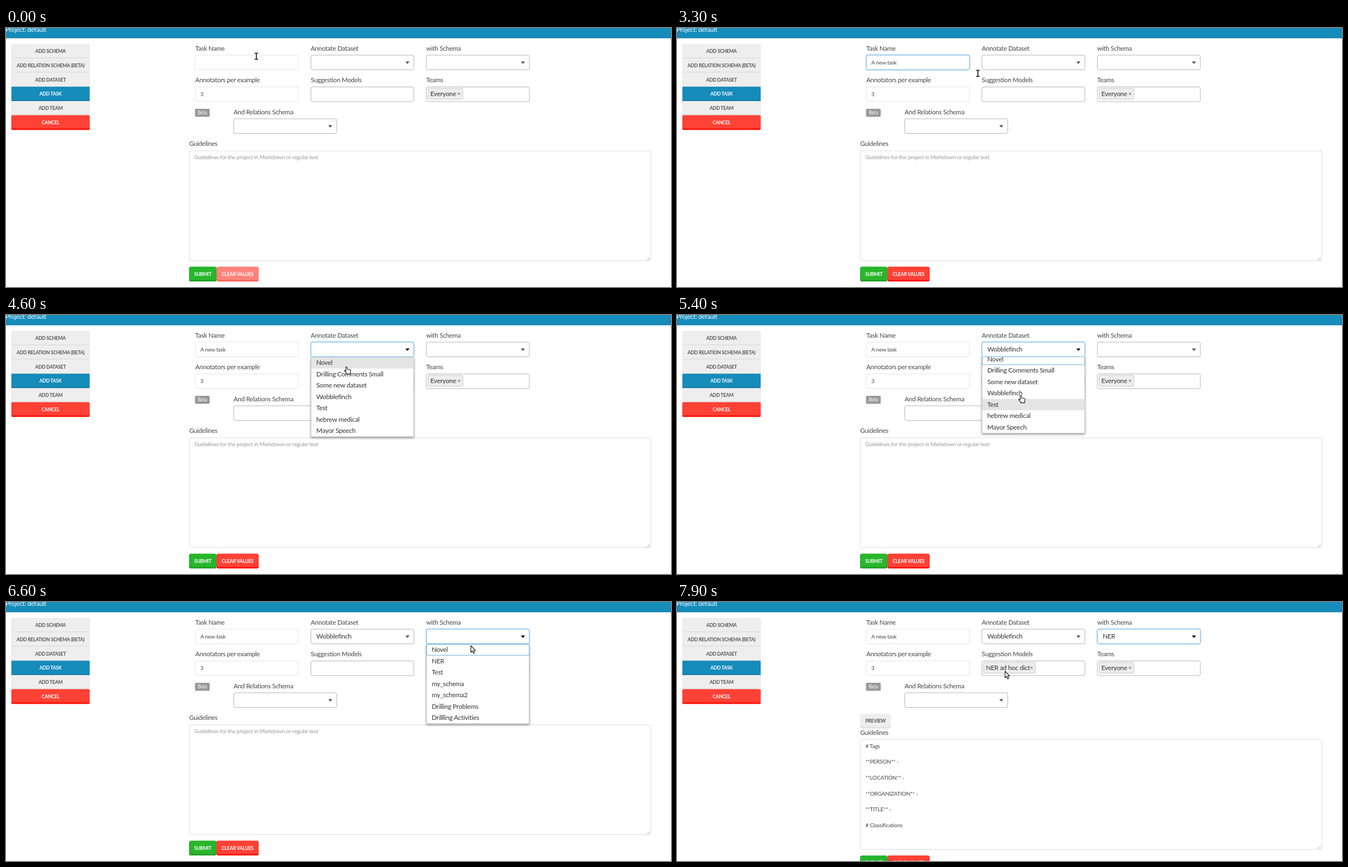
Recreate the animation shown at these times as an HTML page. Size 1198 by 468 pixels, loop 8000 ms.

```html
<!DOCTYPE html>
<html lang="en">
<head>
<meta charset="utf-8">
<title>Add task</title>
<style>
  html, body { margin: 0; width: 100%; height: 100%; overflow: hidden; background: #fff; }
  svg { display: block; }
  text { font-family: Lato, Carlito, sans-serif; white-space: pre; }
  .label { font-size: 11.6px; letter-spacing: -.26px; fill: #444; }
  .item { font-size: 11.8px; letter-spacing: -.25px; fill: #333; }
  .value { font-size: 10.1px; letter-spacing: -.27px; fill: #484848; }
  .hint { fill: #999; }
  .btn { font-size: 8.6px; letter-spacing: -.24px; font-weight: 700; fill: #555; text-anchor: middle; }
  .light { fill: #fff; }
  .input { fill: #fff; stroke: #e4e4e4; }
  .select { fill: #fff; stroke: #b4b4b4; }
  .focus { stroke: #66afe9; filter: drop-shadow(0 0 1.5px #66afe999); }
  .tag { fill: #eee; stroke: #c6c6c6; }
  .list { filter: drop-shadow(0 2px 2px #0006); }
</style>
</head>
<body>
<svg id="stage" width="1198" height="468" viewBox="0 0 1198 468"></svg>
<script>
const LOOP = 8000, STEP = 100, ROW = 20.45, LIST_TOP = 76.3;
const stage = document.getElementById('stage');

const text = (x, y, cls, s, id = '') => `<text ${id && `id="${id}"`} x="${x}" y="${y}" class="${cls}">${s}</text>`;
const rect = (x, y, w, h, attrs) => `<rect x="${x}" y="${y}" width="${w}" height="${h}" ${attrs}/>`;
const box = (x, y, w, h, cls, id = '') => rect(x, y, w, h, `rx="3" class="${cls}" ${id && `id="${id}"`}`);

// the edge shows at both sides and, thicker, at the bottom
function button(x, y, w, label, fill, edge, light, round = 3) {
  return rect(x, y, w, 26.4, `rx="${round}" fill="${edge}"`) +
    rect(x + .7, y, w - 1.4, 23.7, `rx="${round}" fill="${fill}"`) +
    text(x + w / 2, y + 16, 'btn' + (light ? ' light' : ''), label);
}

function sidebar() {
  const names = ['ADD SCHEMA', 'ADD RELATION SCHEMA (BETA)', 'ADD DATASET', 'ADD TASK', 'ADD TEAM', 'CANCEL'];
  return names.map((name, i) => {
    const [fill, edge] = i === 3 ? ['#158cba', '#127ba3'] : i === 5 ? ['#ff4136', '#ff1103'] : ['#eee', '#e2e2e2'];
    return button(9.7, 29.3 + i * 25.7, 141, name, fill, edge, i === 3 || i === 5, i % 5 ? 0 : 2);
  }).join('');
}

const select = (x, y, id) => box(x + .3, y, 185.5, 26.5, 'select', id) +
  `<path id="${id}Arrow" d="M${x + 170.5} ${y + 11.5}h7.4l-3.7 4.4z" fill="#555"/>`;

const tag = (x, w, label) => rect(x + .5, 109, w, 19.5, 'rx="2" class="tag"') +
  text(x + 4.5, 122.5, 'item', label) + text(x + w - 9.2, 122, 'value', '×');

function list(id, x, names) {
  const h = names.length * ROW;
  return `<g clip-path="url(#below)"><g id="${id}" class="list">
    ${rect(x + .5, LIST_TOP, 185, h + .5, 'fill="#fff" stroke="#bbb" stroke-width=".8"')}
    ${rect(x + 1, 0, 184.5, ROW, `id="${id}Hover" fill="#e4e4e4"`)}
    ${rect(x + 1, LIST_TOP, 184.5, ROW - .5, `id="${id}Outline" fill="none" stroke="#6fb0e4"`)}
    ${names.map((n, i) => text(x + 10, LIST_TOP + 14 + i * ROW, 'item', n)).join('')}
  </g></g>`;
}

const notes = ['# Tags', '**PERSON** -', '**LOCATION** -', '**ORGANIZATION** -', '**TITLE** -', '# Classifications'];
const PICK = 'Wobblefinch';
const ARROW = 'M-3.5-7V5L-.8 2.5 1.2 7 3.2 6.1 1.3 1.8H5z';
const HAND = 'M-2.6-5.5q1.3-1 2 .4l.6 3.3 4 .7q1.4.3 1.3 1.7L4.8 4V6H-1.8V4.5L-4.8 1.2q-.6-1.3.8-1.2l1.8 1z';
const BEAM = 'M-3.2-5.5H-.8L0-5 .8-5.5H3.2M-3.2 5.5H-.8L0 5 .8 5.5H3.2M0-5V5';

stage.innerHTML = `
  <defs><clipPath id="below">${rect(540, 76, 420, 160, '')}</clipPath></defs>
  ${rect(0, 0, 1198, 18.5, 'fill="#127ba3"')}${rect(0, 0, 1198, 17.2, 'fill="#158cba"')}
  ${text(-1, 7.3, 'label light', 'Project: default')}
  ${sidebar()}
  ${text(341, 41, 'label', 'Task Name')}
  ${text(549, 41, 'label', 'Annotate Dataset')}
  ${text(757, 41, 'label', 'with Schema')}
  ${text(341, 98, 'label', 'Annotators per example')}
  ${text(549, 98, 'label', 'Suggestion Models')}
  ${text(757, 98, 'label', 'Teams')}
  ${text(410, 156, 'label', 'And Relations Schema')}
  ${box(341, 49, 186, 26.5, 'input', 'task')}
  ${text(350, 66, 'value', '', 'typed')}
  ${rect(0, 56.5, 1, 12, 'id="caret" fill="#333"')}
  ${select(549, 49, 'dataset')}${text(559, 66, 'item', PICK, 'datasetValue')}
  ${select(757, 49, 'schema')}${text(767, 66, 'item', 'NER', 'schemaValue')}
  ${box(341, 106.5, 186, 26, 'input')}${text(350, 123, 'value', '3')}
  ${box(549.3, 106.5, 185.5, 26.5, 'select')}
  ${box(757.3, 106.5, 185.5, 26.5, 'select')}
  ${tag(760, 62.5, 'Everyone')}
  <g id="model">${tag(552, 93, 'NER ad hoc dict')}</g>
  ${rect(340.5, 146, 26.5, 14.5, 'rx="2" fill="#999"')}
  <text x="353.8" y="156.3" class="btn light" style="font-weight:400">Beta</text>
  ${select(410, 164, 'relation')}
  <g id="preview">${button(330, 202, 55, 'PREVIEW', '#eee', '#e2e2e2')}</g>
  <g id="guide">
    ${text(330, 213, 'label', 'Guidelines')}
    ${rect(330.5, 222, 831.3, 198.5, 'rx="2" class="input" style="stroke:#dedede"')}
    ${text(339.3, 237.3, 'value hint', 'Guidelines for the project in Markdown or regular text', 'hint')}
    <g id="notes">${notes.map((n, i) => text(339.5, 237.3 + i * 28.6, 'value', n)).join('')}</g>
    <path d="M1154.5 419.5l5-5M1157.5 419.5l2-2" stroke="#888" stroke-width=".8"/>
    ${button(329.8, 431.6, 49.4, 'SUBMIT', '#28b62c', '#23a127', true)}
    <g id="clear">${button(379.3, 431.6, 75.8, 'CLEAR VALUES', '#ff4136', '#ff1103', true)}</g>
  </g>
  ${rect(340.5, 76.5, 187.5, 35, 'id="suggest" fill="#fff" stroke="#bbb"')}
  ${list('datasets', 549, ['Novel', 'Drilling Comments Small', 'Some new dataset', PICK, 'Test', 'hebrew medical', 'Mayor Speech'])}
  ${list('schemas', 757, ['Novel', 'NER', 'Test', 'my_schema', 'my_schema2', 'Drilling Problems', 'Drillling Activities'])}
  <g id="cursor" stroke-linejoin="round">
    <g id="beam" fill="none"><path d="${BEAM}" stroke="#fff" stroke-width="3.4"/><path d="${BEAM}" stroke="#111" stroke-width="1.6"/></g>
    <path id="hand" d="${HAND}" transform="scale(1.1)" fill="#fff" stroke="#111"/>
    <path id="arrow" d="${ARROW}" fill="#fff" stroke="#111" stroke-width="1.1"/>
  </g>`;

const el = {};
stage.querySelectorAll('[id]').forEach(n => el[n.id] = n);
const show = (id, on) => el[id].style.display = on ? '' : 'none';

// time, x, y of the pointer's middle
const path = [
  [0, 451, 51], [100, 451, 51], [300, 451, 50], [2800, 451, 50], [3100, 459, 30], [3200, 459, 30],
  [3300, 542, 82], [3500, 568, 94], [4100, 603, 66], [4300, 607, 72], [4600, 615, 100],
  [4800, 617, 125], [4900, 617, 125], [5000, 619, 144], [5100, 621, 152], [5400, 621, 152],
  [5700, 700, 105], [6200, 841, 66], [6400, 841, 72], [6600, 841, 86], [6800, 841, 109],
  [7000, 841, 110], [7300, 841, 110], [7800, 606, 130], [7900, 594.5, 132]
];
const keys = [[900, 'A'], [1200, 'A '], [1700, 'A n'], [1800, 'A ne'], [1900, 'A new '],
  [2100, 'A new t'], [2300, 'A new tas'], [2500, 'A new task']];

const clamp = v => Math.max(0, Math.min(1, v));
const ramp = (t, a, b) => clamp((t - a) / (b - a));

function pointer(t) {
  const i = path.findIndex(p => p[0] > t);
  if (i < 0) return path[path.length - 1].slice(1);
  const [a, x, y] = path[i - 1], [b, u, v] = path[i], k = ramp(t, a, b);
  return [x + (u - x) * k, y + (v - y) * k];
}

function drop(id, open, row, outlined) {
  show(id, open > 0);
  el[id].setAttribute('transform', `translate(0 ${-150 * (1 - open)})`);
  show(id + 'Hover', row >= 0);
  el[id + 'Hover'].setAttribute('y', LIST_TOP + row * ROW);
  show(id + 'Outline', outlined);
}

function focus(id, on) {
  el[id].classList.toggle('focus', on);
  if (el[id + 'Arrow']) el[id + 'Arrow'].setAttribute('fill', on ? '#000' : '#555');
}

function draw(t) {
  const typed = keys.reduce((s, k) => t >= k[0] ? k[1] : s, '');
  el.typed.textContent = typed;
  focus('task', t >= 200 && t < 4100);
  show('caret', t >= 300 && t < 3000);
  el.caret.setAttribute('x', 350 + (typed ? el.typed.getComputedTextLength() : 0));
  show('suggest', t >= 900 && t < 1300);
  el.clear.setAttribute('opacity', .65 + .35 * ramp(t, 800, 1000));

  focus('dataset', t >= 4100 && t < 6300);
  focus('schema', t >= 6300);
  show('datasetValue', t >= 5400);
  show('schemaValue', t >= 7300);
  const row = t < 4700 ? 0 : t < 4800 ? 1 : t < 5000 ? 2 : t < 5400 ? 3 : 4;
  drop('datasets', ramp(t, 4100, 4300) * (t < 5400 ? 1 : .957 * (1 - ramp(t, 5400, 5600))), row, t >= 5400);
  drop('schemas', ramp(t, 6200, 6400) * (1 - ramp(t, 7200, 7400)), t < 6800 ? -1 : 1, t < 6800);

  const filled = t >= 7400;
  show('model', filled);
  show('preview', filled);
  show('notes', filled);
  show('hint', !filled);
  el.guide.setAttribute('transform', `translate(0 ${filled ? 26.6 : 0})`);

  const beam = t < 3400, hand = t >= 4500 && t < 5500;
  show('beam', beam);
  show('hand', hand);
  show('arrow', !beam && !hand);
  el.cursor.setAttribute('transform', `translate(${pointer(t)})`);
}

const start = performance.now();
function tick(now) {
  const t = Math.max(0, now - start) % LOOP;
  draw(Math.floor(t / STEP) * STEP);
  requestAnimationFrame(tick);
}
draw(0);
requestAnimationFrame(tick);
</script>
</body>
</html>
```
